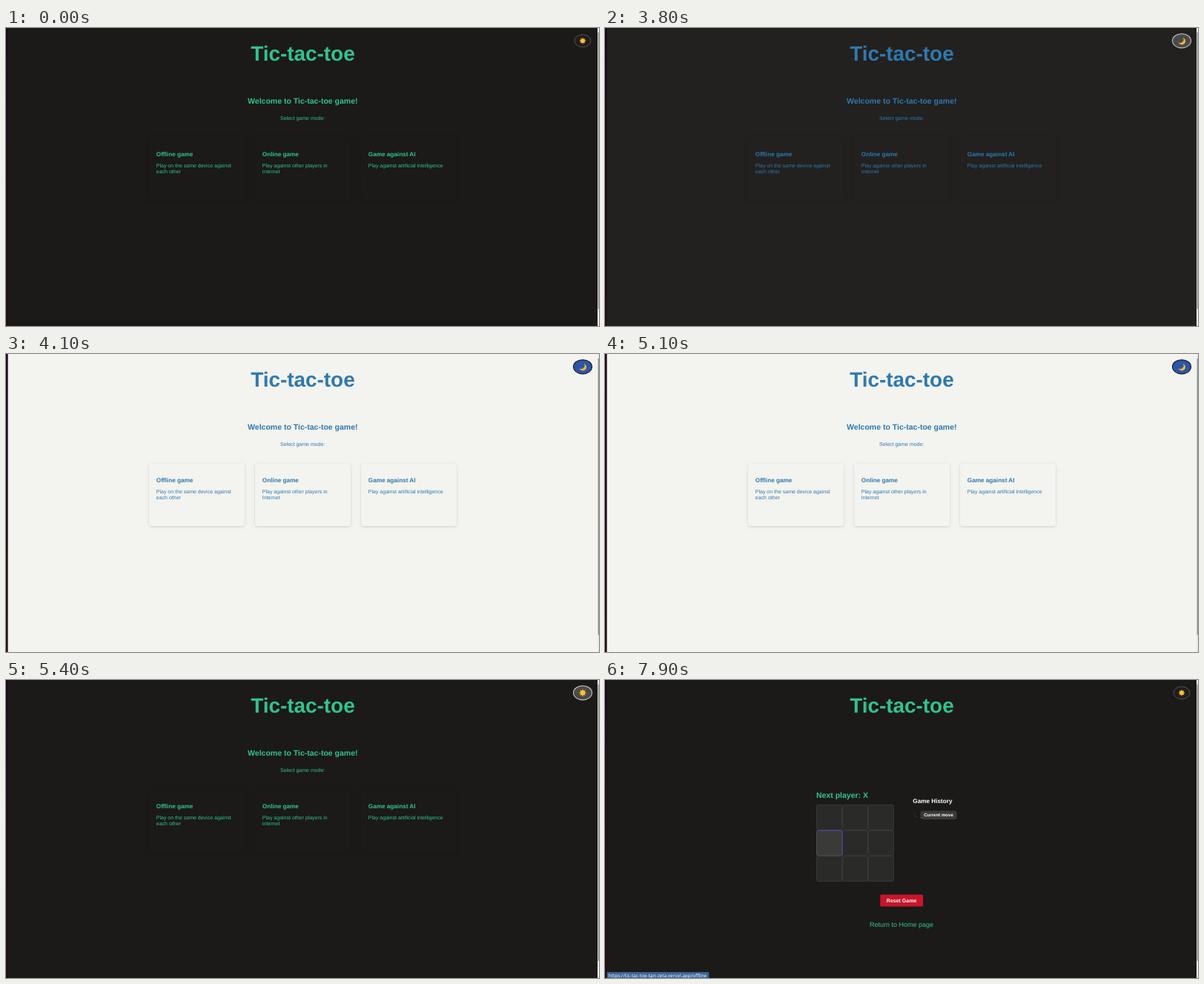
An HTML page that plays this animation: 800 by 402 pixels, repeating every 8 s.

```html
<!DOCTYPE html>
<html lang="en">
<head>
<meta charset="utf-8">
<title>Tic-tac-toe</title>
<style>
  html, body { margin: 0; width: 100%; height: 100%; overflow: hidden; background: #1b1a18; }
  svg { display: block; width: 800px; height: 402px; font-family: "Liberation Sans", Arial, sans-serif; text-rendering: geometricPrecision; }
  .bold { font-weight: bold; }
  .mid { text-anchor: middle; }
  .small { font-size: 7px; }
  .h3 { font-size: 8.19px; font-weight: bold; }
  .h2 { font-size: 10.5px; font-weight: bold; }
  .card { filter: drop-shadow(0 1.5px 1.5px rgba(0, 0, 0, .13)) drop-shadow(0 1px 5px rgba(0, 0, 0, .03)); }
  .cell { fill: #2a2a28; stroke: #454542; stroke-width: .7; }
</style>
</head>
<body>
<svg viewBox="0 0 800 402">
  <defs>
    <linearGradient id="edge" x2="0" y2="1">
      <stop offset="0" stop-color="#1c0a1d"/>
      <stop offset="1" stop-color="#240f10"/>
    </linearGradient>
  </defs>
  <rect id="page" width="800" height="402"/>
  <rect width="2.6" height="402" fill="url(#edge)"/>
  <rect x="798" width="2" height="402" fill="#e9e9e9"/>
  <rect x="798.7" y="6" width="1.3" height="373" fill="#8e8e8e"/>

  <g id="ink">
    <text class="bold mid" x="400.4" y="44.3" font-size="27.9">Tic-tac-toe</text>
    <g id="home">
      <text class="h2 mid" x="400.3" y="101.5">Welcome to Tic-tac-toe game!</text>
      <text class="small mid" x="400.2" y="124">Select game mode:</text>
      <g id="cards"></g>
    </g>
    <g id="game">
      <text class="h2" x="285" y="158.6">Next player: X</text>
      <text class="mid" x="400" y="333" font-size="9">Return to Home page</text>
      <g id="board"></g>
      <g id="hotCell">
        <rect class="cell" x="285.6" y="203" width="34.4" height="34" rx="2" style="fill:#3a3a38;stroke:#5b5b60"/>
        <path d="M286 203H319.4Q320.3 203 320.3 204V236" fill="none" stroke="#4442b4" stroke-width=".9"/>
      </g>
      <text class="h3" x="415.3" y="166.4" fill="#fff">Game History</text>
      <text class="small" x="416.5" y="184.6" fill="#3a3a37">1.</text>
      <rect x="425.5" y="176.5" width="49" height="11.6" rx="3" fill="#3a3a38"/>
      <text class="bold mid" x="450" y="184.4" font-size="6.125" fill="#fff">Current move</text>
      <rect x="371.3" y="289.6" width="57.8" height="16" rx="1.5" fill="#c9152a"/>
      <text class="bold small mid" x="400.1" y="300" fill="#fff">Reset Game</text>
    </g>
  </g>

  <g id="toggle">
    <ellipse id="disc" rx="11" ry="8.4" stroke-width=".9"/>
    <g id="sun" fill="#f4b02f">
      <path id="rays"/>
      <circle r="2.7" fill="#fbc23a"/>
    </g>
    <path id="moon" fill="#f6b833" transform="scale(.84)" d="M1.6-4.4A5 5 0 1 1-4.6 1.8A4.4 4.4 0 0 0 1.6-4.4Z"/>
  </g>

  <g id="status">
    <rect x="2.5" y="394" width="137.8" height="8" rx="1" fill="#3c6596"/>
    <text x="4.8" y="400.8" font-size="6.4" fill="#fff" style="font-family:'Noto Sans',sans-serif">https://tic-tac-toe-tan-zeta.vercel.app/offline</text>
  </g>
</svg>
<script>
const LOOP = 8000, STEP = 100;
const HOVER_ON = 3250, TO_LIGHT = 3785, TO_DARK = 5115, HOVER_OFF = 5900, LINK_HOVER = 6500, OPEN_GAME = 7200;

const $ = id => document.getElementById(id);
const show = (id, on) => $(id).style.display = on ? '' : 'none';
const clamp = v => Math.min(1, Math.max(0, v));
const mix = (a, b, k) => `rgb(${a.map((v, i) => Math.round(v + (b[i] - v) * k))})`;
const mixList = (a, b, k) => a.map((v, i) => v + (b[i] - v) * k);

// CSS "ease": cubic-bezier(.25, .1, .25, 1)
function ease(x) {
  if (x <= 0 || x >= 1) return clamp(x);
  let lo = 0, hi = 1, s;
  for (let i = 0; i < 20; i++) {
    s = (lo + hi) / 2;
    const bx = .75 * s * (1 - s) + s ** 3;
    if (bx < x) lo = s; else hi = s;
  }
  return .3 * s * (1 - s) ** 2 + 3 * s * s * (1 - s) + s ** 3;
}
const fade = (t, start, length = 300) => ease((t - start) / length);

$('cards').innerHTML = [
  ['Offline game', 'Play on the same device against', 'each other'],
  ['Online game', 'Play against other players in', 'Internet'],
  ['Game against AI', 'Play against artificial intelligence', '']
].map(([title, ...lines], i) => {
  const x = 193 + 143 * i;
  return `<rect class="card" x="${x}" y="148" width="129" height="84" rx="3"/>
    <text class="h3" x="${x + 9.8}" y="172.5">${title}</text>` +
    lines.map((line, n) => `<text class="small" x="${x + 9.8}" y="${187.5 + 8 * n}">${line}</text>`).join('');
}).join('');

$('board').innerHTML = Array.from({ length: 9 }, (_, i) =>
  `<rect class="cell" x="${285.6 + 34.8 * (i % 3)}" y="${168.4 + 34.6 * Math.floor(i / 3)}" width="34.2" height="34" rx="2"/>`
).join('');

$('rays').setAttribute('d', 'M' + Array.from({ length: 16 }, (_, i) => {
  const r = i % 2 ? 2.6 : 4.7, a = i * Math.PI / 8;
  return `${r * Math.sin(a)} ${-r * Math.cos(a)}`;
}).join('L') + 'Z');

const cards = document.querySelectorAll('.card');
const DARK = [27, 26, 24], LIGHT = [243, 243, 239];

function draw(t) {
  const light = fade(t, TO_LIGHT) - fade(t, TO_DARK);
  const hover = fade(t, HOVER_ON) - fade(t, HOVER_OFF);
  const isLight = t >= TO_LIGHT && t < TO_DARK;
  const page = mix(DARK, LIGHT, light);

  $('page').setAttribute('fill', page);
  cards.forEach(card => card.setAttribute('fill', page));
  $('ink').setAttribute('fill', isLight ? '#2f79ae' : '#30c48e');

  const hoverFill = mixList([74, 74, 72], [44, 86, 166], light);
  const hoverLine = mixList([205, 205, 203], [18, 18, 24], light);
  $('disc').setAttribute('fill', mix([31, 30, 28], hoverFill, hover));
  $('disc').setAttribute('stroke', mix([88, 88, 85], hoverLine, hover));
  $('toggle').setAttribute('transform', `translate(778 17.3) scale(${1 + .14 * hover})`);
  show('sun', !isLight);
  show('moon', isLight);

  show('home', t < OPEN_GAME);
  show('game', t >= OPEN_GAME);
  show('status', t >= LINK_HOVER);
  $('hotCell').setAttribute('opacity', fade(t, OPEN_GAME));
}

function tick(now) {
  draw(Math.floor(now % LOOP / STEP) * STEP);
  requestAnimationFrame(tick);
}
draw(0);
requestAnimationFrame(tick);
</script>
</body>
</html>
```
